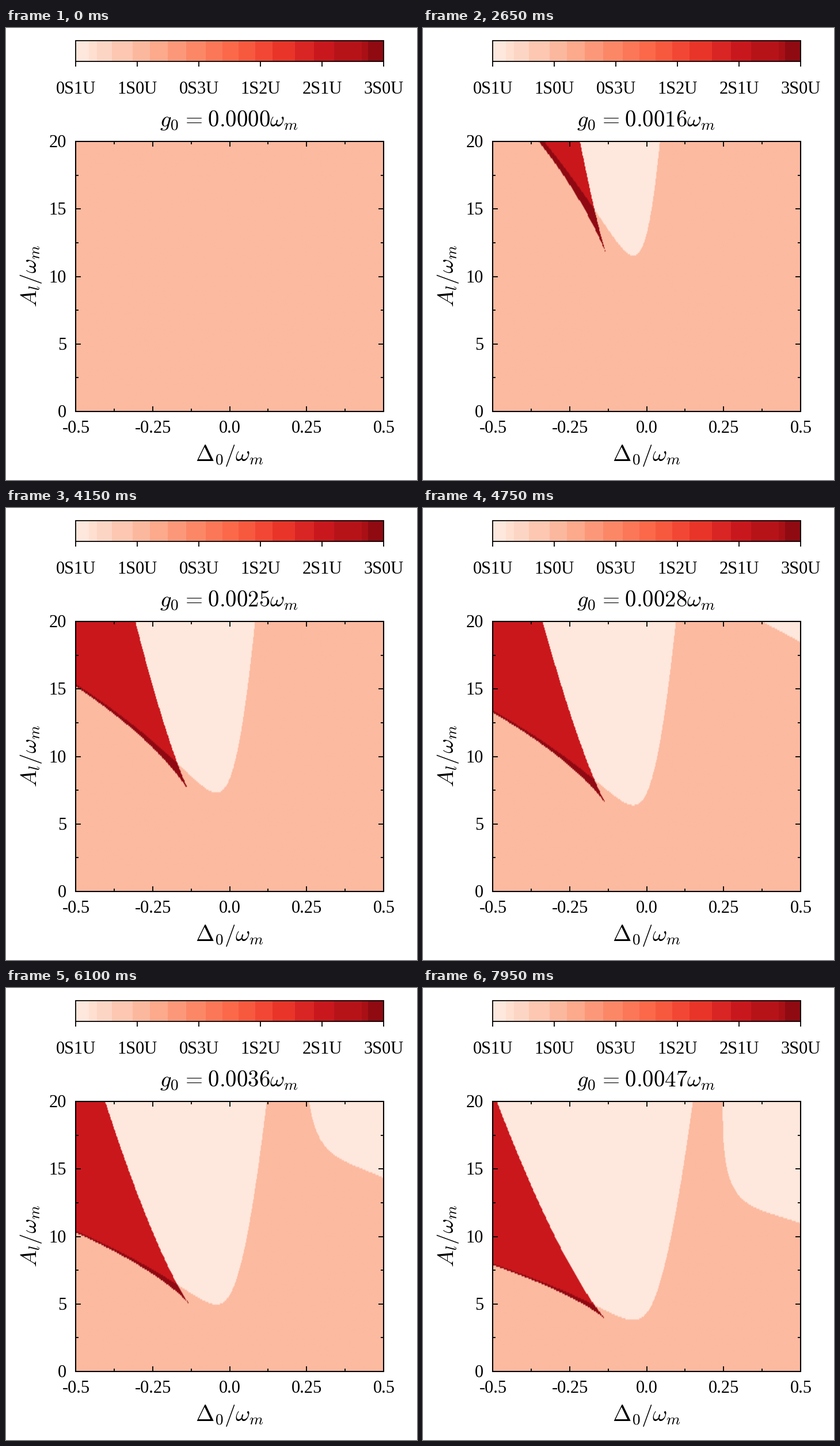
These frames come from a looping animation (714x785 px, 8 s). A matplotlib script:

```python
import numpy as np
import matplotlib.pyplot as plt
from matplotlib.animation import FuncAnimation
from matplotlib.patches import Rectangle

plt.rcParams["font.family"] = "Liberation Serif"
plt.rcParams["mathtext.fontset"] = "cm"

WIDTH, HEIGHT, DPI = 714, 785, 100
LEFT, RIGHT, TOP, BOTTOM = 121, 656, 197, 666
FRAMES, INTERVAL = 160, 50
LABEL_SIZE, MATH_SIZE = 22, 28
COLUMNS, ROWS = 400, 200

KAPPA = 0.15            # cavity linewidth, in units of the mechanical frequency
DAMPING, SHIFT = 0.0357, 17.17   # oscillatory instability at large detuning

reds = plt.get_cmap("Reds")

fig = plt.figure(figsize=(WIDTH / DPI, HEIGHT / DPI), dpi=DPI, facecolor="white")
ax = fig.add_axes([0, 0, 1, 1])
ax.axis("off")


def label(x, y, text, size=LABEL_SIZE, ha="center", rotation=0):
    return ax.text(x, y, text, size=size, ha=ha, va="baseline",
                   rotation=rotation, rotation_mode="anchor")


def line(x0, y0, x1, y1, lw=1.3):
    ax.plot([x0, x1], [y0, y1], color="black", lw=lw,
            solid_capstyle="butt", zorder=4)


def box(x0, y0, x1, y1, lw):
    ax.add_patch(Rectangle((x0, y0), x1 - x0, y1 - y0, fill=False,
                           ec="black", lw=lw, zorder=5))


def x_pos(detuning):
    return LEFT + (detuning + 0.5) * (RIGHT - LEFT)


def y_pos(amplitude):
    return BOTTOM - amplitude / 20 * (BOTTOM - TOP)


def draw_colorbar():
    top, bottom = 22, 58
    edges = [121, 144, 158, 184, 220, 250, 281, 313, 347, 376, 404,
             433, 463, 502, 535, 570, 618, 629, 656]
    for a, b in zip(edges, edges[1:]):
        value = ((a + b) / 2 - 121) / 107
        if a == edges[0]:
            value = 0
        elif b == edges[-1]:
            value = 5
        ax.add_patch(Rectangle((a, top), b - a, bottom - top, lw=0,
                               fc=reds((value + 0.5) / 6), antialiased=False))
    box(121, top, 656, bottom, 1.3)
    for i, name in enumerate(["0S1U", "1S0U", "0S3U", "1S2U", "2S1U", "3S0U"]):
        x = 121 + 107 * i
        line(x, bottom, x, bottom + 9)
        label(x + 0.5, 114, name)


def draw_axes():
    box(LEFT, TOP, RIGHT, BOTTOM, 1.5)
    for i in range(9):
        size = 5 if i % 2 else 9
        x, y = x_pos(-0.5 + i / 8), y_pos(2.5 * i)
        line(x, BOTTOM, x, BOTTOM - size)
        line(x, TOP, x, TOP + size)
        line(LEFT, y, LEFT + size, y)
        line(RIGHT, y, RIGHT - size, y)
    for i, name in enumerate(["-0.5", "-0.25", "0.0", "0.25", "0.5"]):
        label(x_pos(-0.5 + i / 4) + 0.5, 703, name)
    for a in range(0, 21, 5):
        label(105, y_pos(a) + 10, str(a), ha="right")
    label(388.5, 752, r"$\Delta_0/\omega_m$", MATH_SIZE)
    label(53, 430.5, r"$A_l/\omega_m$", MATH_SIZE, rotation=90)


def is_unstable(x, detuning):
    delta = detuning + 2 * x
    width = KAPPA ** 2 / 4 + delta ** 2
    pull = 4 * x * delta
    return (pull > width) | (DAMPING * (1 - width) ** 2 + SHIFT * x ** 2 < pull)


DETUNING, AMPLITUDE = np.meshgrid(np.linspace(-0.5, 0.5, COLUMNS + 1),
                                  np.linspace(20, 0, ROWS + 1))


def stability_map(g):
    """Count stable roots of X (kappa^2/4 + (detuning + 2X)^2) = (g A)^2."""
    b = DETUNING
    c = (b ** 2 + KAPPA ** 2 / 4) / 4
    d = -(g * AMPLITUDE) ** 2 / 4
    p = c - b ** 2 / 3
    half_q = b * (b * b / 27 - c / 6) + d / 2
    disc = half_q ** 2 + (p / 3) ** 3
    root = np.sqrt(np.maximum(disc, 0))
    single = np.cbrt(root - half_q) - np.cbrt(root + half_q) - b / 3
    zones = np.where(is_unstable(single, b), 0.0, 1.0)

    triple = disc < 0
    if triple.any():
        bt = b[triple]
        r = np.sqrt(-p[triple] / 3)
        angle = np.arccos(np.clip(-half_q[triple] / r ** 3, -1, 1)) / 3
        stable = sum(~is_unstable(2 * r * np.cos(angle - 2 * np.pi * k / 3) - bt / 3, bt)
                     * 1.0 for k in range(3))
        zones[triple] = 2 + stable
    return zones


def title_text(g):
    return r"$g_0\hspace{0.075}=\hspace{0.075}%.4f\omega_m$" % g


draw_colorbar()
draw_axes()
title = label(387.5, 172, title_text(0), MATH_SIZE)

dx, dy = (RIGHT - LEFT) / COLUMNS / 2, (BOTTOM - TOP) / ROWS / 2
image = ax.imshow(stability_map(0), cmap=reds, vmin=-0.5, vmax=5.5, aspect="auto",
                  extent=(LEFT - dx, RIGHT + dx, BOTTOM + dy, TOP - dy),
                  interpolation="bilinear", interpolation_stage="rgba", zorder=1)
image.set_clip_path(Rectangle((LEFT, TOP), RIGHT - LEFT, BOTTOM - TOP,
                              transform=ax.transData))
ax.set_xlim(0, WIDTH)
ax.set_ylim(HEIGHT, 0)


def update(frame):
    g = 3 * max(frame - 1, 0) / 1e5
    image.set_data(stability_map(g))
    title.set_text(title_text(g))
    return image, title


animation = FuncAnimation(fig, update, frames=FRAMES, interval=INTERVAL,
                          repeat=True, repeat_delay=0)
plt.show()
```
